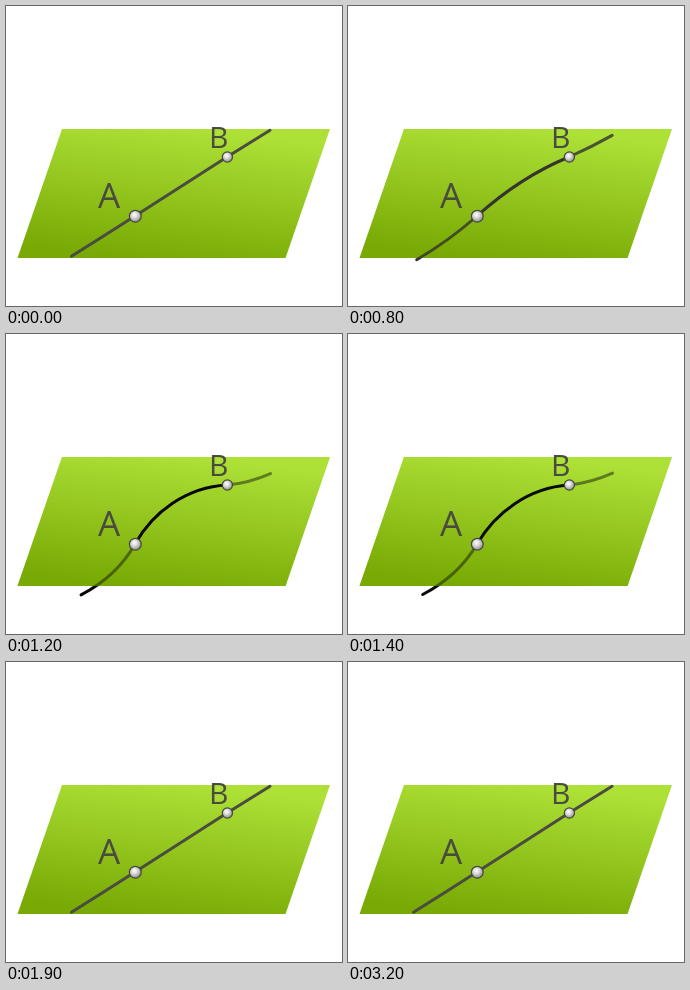
Write an HTML page that moves like this. It is 336 by 300 pixels and loops after 3500 ms.

```html
<!DOCTYPE html>
<html lang="en">
<head>
<meta charset="utf-8">
<title>Line through two points</title>
<style>
html, body { margin: 0; width: 100%; height: 100%; overflow: hidden; background: #fff; }
svg { display: block; width: 336px; height: 300px; }
text { font-family: "Open Sans", "Noto Sans", sans-serif; fill: #494b3f; }
.line { fill: none; stroke-width: 3; stroke-linecap: round; stroke-linejoin: round; }
.dot { fill: url(#pearl); stroke: #45473f; stroke-width: 1.2; }
</style>
</head>
<body>
<svg viewBox="0 0 336 300">
  <defs>
    <linearGradient id="grass" gradientUnits="userSpaceOnUse" x1="181" y1="122" x2="165" y2="257">
      <stop offset="0" stop-color="#ade137"/>
      <stop offset="1" stop-color="#78a904"/>
    </linearGradient>
    <radialGradient id="pearl" cx="0.42" cy="0.38" r="0.62">
      <stop offset="0" stop-color="#fff"/>
      <stop offset="0.4" stop-color="#dcdcdc"/>
      <stop offset="1" stop-color="#8e8e8e"/>
    </radialGradient>
    <path id="plane" d="M56 123H324L279.5 252H11.5Z" fill="url(#grass)"/>
  </defs>
  <use href="#plane"/>
  <path id="tails" class="line"/>
  <use id="veil" href="#plane"/>
  <path id="arch" class="line"/>
  <circle class="dot" cx="129.3" cy="210.2" r="5.9"/>
  <circle class="dot" cx="221.4" cy="151" r="5.1"/>
  <text x="92" y="202" font-size="35">A</text>
  <text x="203" y="141.5" font-size="30">B</text>
</svg>
<script>
const LOOP = 3500, STEP = 100, LAST = 3200;
const RISE = 500, PEAK = 1300, FLAT = 1900, MAX_BEND = 1.05;
const [tails, veil, arch] = ["tails", "veil", "arch"].map(id => document.getElementById(id));
const A = "129 210", B = "221 151";

const smooth = (from, to, t) => {
  const p = Math.min(1, Math.max(0, (t - from) / (to - from)));
  return p * p * (3 - 2 * p);
};
const bendAt = t => MAX_BEND * (smooth(RISE, PEAK, t) - smooth(PEAK, FLAT, t));
const mix = (a, b, k) => Math.round(a + (b - a) * Math.min(1, k));

function draw(time) {
  const t = Math.min(LAST, Math.floor((time % LOOP) / STEP) * STEP);
  const k = bendAt(t);
  const pt = (x, y, dx, dy) => `${(x + dx * k).toFixed(2)} ${(y + dy * k).toFixed(2)}`;
  const low = pt(65.5, 250.3, 9.5, 10.5), high = pt(264, 124.3, 0.5, 15.2);

  tails.setAttribute("d",
    `M${low}Q${pt(97, 230.5, 14, 11.5)} ${A}M${B}Q${pt(242.5, 137.7, 0.5, 11.3)} ${high}`);
  arch.setAttribute("d",
    `M${A}C${pt(159.7, 190.3, -12.5, -12.3)} ${pt(190.3, 170.7, -10, -17.5)} ${B}`);

  const ink = `rgb(${mix(74, 8, k)},${mix(76, 8, k)},${mix(64, 8, k)})`;
  tails.setAttribute("stroke", ink);
  arch.setAttribute("stroke", ink);
  // The outer parts sink below the translucent plane as the line bends.
  veil.setAttribute("opacity", Math.min(1, 0.55 * k).toFixed(3));
}

const start = performance.now();
function tick() {
  draw(performance.now() - start);
  requestAnimationFrame(tick);
}
tick();
</script>
</body>
</html>
```
